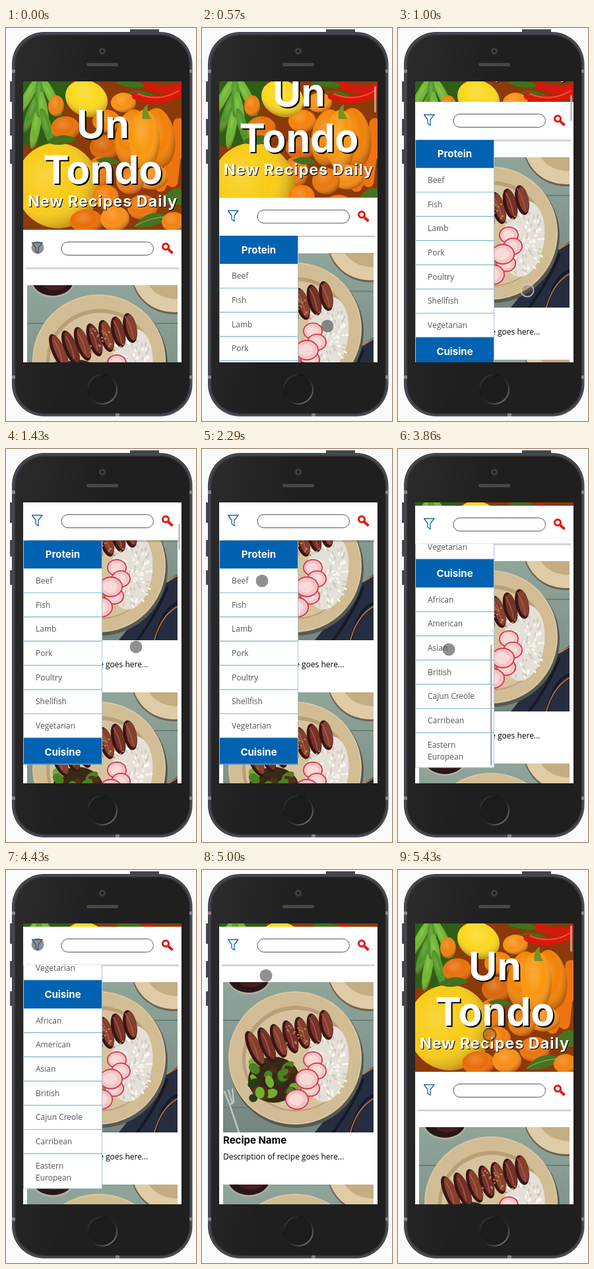
Recreate the animation shown at these times as an HTML page. Size 288 by 596 pixels, loop 5570 ms.

```html
<!DOCTYPE html>
<html lang="en">
<head>
<meta charset="utf-8">
<title>Recipe app</title>
<style>
html, body { margin: 0; width: 100%; height: 100%; overflow: hidden; background: #fafafa; }
body > svg { display: block; width: 100vw; height: 100vh; }
text { font: 12px "Open Sans", sans-serif; }
.bold { font: 700 15px Inter, sans-serif; }
.hero { font: 700 59px Inter, sans-serif; fill: #fff; text-anchor: middle; filter: drop-shadow(2px 2px 0 #000); }
.tag { font-size: 23.5px; letter-spacing: .9px; filter: drop-shadow(1.5px 1.5px 0 #000); }
.head { fill: #fff; text-anchor: middle; }
.item { fill: #555; }
</style>
</head>
<body>
<svg viewBox="0 0 288 596">
  <defs>
    <clipPath id="screenClip"><path d="M26 81h240v426H26z"/></clipPath>
    <clipPath id="dishClip"><path d="M0 0h228v228H0z"/></clipPath>
    <radialGradient id="shade" cx=".4" cy=".35" r=".65">
      <stop stop-color="#fff" stop-opacity=".2"/>
      <stop offset=".55" stop-color="#fff" stop-opacity="0"/>
      <stop offset="1" stop-color="#5a1c00" stop-opacity=".35"/>
    </radialGradient>
    <linearGradient id="homeRim" x2="1" y2="1">
      <stop stop-color="#555"/><stop offset=".3" stop-color="#151515"/>
      <stop offset=".6" stop-color="#2a2a2a"/><stop offset="1" stop-color="#8c8c8c"/>
    </linearGradient>
    <linearGradient id="face" x2="1" y2=".3">
      <stop stop-color="#2b2b2b"/><stop offset=".5" stop-color="#1f1f1f"/>
    </linearGradient>
    <linearGradient id="table" x2="0" y2="1">
      <stop stop-color="#8fa59a"/><stop offset="1" stop-color="#75857f"/>
    </linearGradient>
    <linearGradient id="navShadow" x2="0" y2="1">
      <stop stop-color="#000" stop-opacity=".32"/><stop offset="1" stop-color="#000" stop-opacity="0"/>
    </linearGradient>
    <g id="dish" clip-path="url(#dishClip)"></g>
    <g id="card">
      <use href="#dish"/>
      <text class="bold" y="245">Recipe Name</text>
      <text y="269">Description of recipe goes here...</text>
    </g>
  </defs>

  <!-- phone -->
  <path d="M6 81h6v31H6zM6 138h6v25H6zM6 184h6v22H6zM188 2h44v6h-44z" fill="#46474e"/>
  <rect x="9" y="6" width="273.5" height="583" rx="49" fill="#3c3d44"/>
  <rect x="11" y="8" width="270" height="579.5" rx="47.5" fill="none" stroke="#5a5b63"/>
  <path d="M9 63h5v5H9zM278 63h5v5h-5zM9 527h5v5H9zM278 527h5v5h-5zM166 584h6v5h-6z" fill="#85868c"/>
  <rect x="14" y="11" width="264" height="573.5" rx="45" fill="url(#face)"/>
  <circle cx="146" cy="35" r="5.5" fill="#34343a"/>
  <circle cx="146" cy="35" r="3" fill="#1b1b22" stroke="#55555e"/>
  <rect x="122" y="53" width="48" height="5" rx="2.5" fill="#47474b"/>
  <circle cx="146" cy="548" r="22" fill="#1c1c1c" stroke="url(#homeRim)" stroke-width="2"/>

  <g clip-path="url(#screenClip)">
    <path d="M26 81h240v426H26z" fill="#fff"/>
    <g id="page"><use href="#card" x="32" y="390"/><use href="#card" x="32" y="697"/></g>
    <svg id="hero" x="26" y="81" width="240" height="225">
      <g transform="translate(-26 -81)">
        <g id="veg"></g>
        <g id="title">
          <text class="hero" x="147" y="167">Un</text>
          <text class="hero" x="147" y="236">Tondo</text>
          <text class="hero tag" x="146.5" y="271">New Recipes Daily</text>
        </g>
      </g>
    </svg>
    <g id="nav">
      <path d="M30 57h232v4H30z" fill="url(#navShadow)"/>
      <path d="M26 0h240v57.5H26z" fill="#fff"/>
      <path d="M39.5 19.5h15.5l-6 7.5v8.5l-4-3v-5.5z" fill="none" stroke="#1464a5" stroke-width="1.3" stroke-linejoin="round"/>
      <rect x="84" y="18.5" width="139.5" height="20" rx="10" fill="#fff" stroke="#555"/>
      <g fill="none" stroke="#e3170d"><circle cx="242" cy="25.5" r="4.5" stroke-width="3"/><path d="M246 29.5l6.5 6" stroke-width="4"/></g>
    </g>
    <svg id="menu" x="26" width="120" height="340">
      <path d="M0 0h120v340H0z" fill="#fff"/>
      <g id="list"></g>
      <rect id="thumb" x="114" width="2.5" height="183" rx="1.2" fill="#aaa"/>
      <path d="M.5 0v339.5h119V0" fill="none" stroke="#9cc6e0"/>
    </svg>
    <rect id="bar" x="261" width="3" height="40" rx="1.5" fill="#b9b9b9" fill-opacity=".8"/>
    <circle id="touch" r="9.5"/>
  </g>
</svg>
<script>
const $ = id => document.getElementById(id);
const set = (id, attrs) => { for (const a in attrs) $(id).setAttribute(a, attrs[a]); };

const oval = (x, y, rx, ry, fill, turn = 0) =>
  `<ellipse cx="${x}" cy="${y}" rx="${rx}" ry="${ry}" fill="${fill}" transform="rotate(${turn} ${x} ${y})"/>`;
const fruit = (x, y, rx, ry, fill, turn) =>
  oval(x, y, rx, ry, fill, turn) + oval(x, y, rx, ry, 'url(#shade)', turn);
const path = (d, fill, stroke = 'none', width = 1) =>
  `<path d="${d}" fill="${fill}" stroke="${stroke}" stroke-width="${width}" stroke-linecap="round"/>`;
const many = (n, make) => Array.from({ length: n }, (_, i) => make(i)).join('');

let seed = 7;
const rand = () => (seed = seed * 16807 % 2147483647) / 2147483647;

$('veg').innerHTML =
  path('M26 81h240v225H26z', '#8c3a08') +
  path('M26 81h72l-14 60-12 38H26z', '#2e5f14') +
  many(7, i => fruit(33 + i * 6, 104 + (i % 3) * 24, 7, 32, i % 2 ? '#4c9422' : '#6db52f', 28 - i * 9)) +
  fruit(76, 118, 12, 16, '#ef7f0c') + fruit(90, 152, 22, 18, '#e86f08') +
  fruit(152, 141, 21, 17, '#f58207') + fruit(178, 113, 19, 15, '#f98f12') +
  fruit(122, 107, 33, 27, '#fbd81c', 25) +
  path('M165 83q28 12 52 5q-24-11-52-5M186 97q18 14 42 8q-18-13-42-8', '#3c741d') +
  path('M196 103q36 14 70-6M214 87q28 13 52 2', 'none', '#d8180d', 11) +
  path('M200 100q32 13 62-5', 'none', '#f4502f', 2) +
  path('M262 145l-10 88M266 178l-32 62', 'none', '#ed7410', 17) +
  fruit(150, 181, 23, 19, '#d96507') + fruit(142, 218, 19, 23, '#ef780b') +
  fruit(190, 166, 24, 43, '#f38506', 8) + fruit(232, 166, 24, 45, '#f18003', -8) +
  fruit(210, 170, 23, 46, '#fa970d') +
  path('M207 138q-2-17 8-22q-2 15 6 22', '#719426') +
  fruit(221, 226, 25, 19, '#f58a13') + fruit(188, 232, 21, 20, '#e97808') +
  fruit(78, 239, 63, 65, '#f8cb12', -20) +
  path('M60 173q24-19 48-4q-26 14-48 4M136 200q24-10 37 5q-22 6-37-5', '#456f1e') +
  fruit(151, 256, 20, 18, '#f57d08') + fruit(122, 293, 25, 18, '#e96c05') +
  fruit(165, 289, 22, 19, '#f88d12') + fruit(207, 272, 23, 19, '#ed7309') +
  path('M194 302q20-31 53-17q-18 21-53 17M236 262q12-23 30-18v23q-15 5-30-5', '#47721f') +
  fruit(254, 294, 18, 15, '#f28110') +
  path('M196 300q23-13 48-14', 'none', '#9eb84b');

const meat = i => {
  const x = 48 + i * 18, y = 101 - i * 6;
  return oval(x, y, 10, 29 - i, '#3a1512', -24 + i * 2) +
    oval(x + 2, y - 1, 7.5, 26 - i, i % 2 ? '#743229' : '#86402f', -24 + i * 2) +
    path(`M${x - 7} ${y - 17}q9 14 12 33`, 'none', '#a75c48', 1.5);
};
const radish = (x, y, r) => oval(x, y, r, r * .87, '#d6344e') +
  oval(x, y, r - 1.8, r * .87 - 1.8, '#f6c4c4') + oval(x - 1, y, r * .6, r * .5, '#f9dad6');

$('dish').innerHTML =
  path('M0 0h228v228H0z', 'url(#table)') +
  path('M0 58h228M0 190h228', 'none', '#677f78', 2) +
  oval(39, -8, 34, 27, '#b3aaa0') + oval(39, -9, 32, 25, '#261718') + oval(42, -7, 21, 15, '#4b1d20') +
  oval(222, -18, 64, 62, '#6b6354') + oval(222, -20, 63, 61, '#dfcba5') + oval(225, -24, 48, 45, '#c4ad83') +
  path('M228 128Q198 148 180 176L139 228H228z', '#272d40') +
  path('M228 172q-23 7-34 56M212 148q-12 34-45 80', 'none', '#151a29', 4) +
  path('M213 139l15-9M228 177q-25 13-35 51', 'none', '#d57932', 1.5) +
  path('M2 166l8 20 14 42M8 164l6 20M14 162l2 20-6 4', 'none', '#c0c5c1', 2.5) +
  oval(111, 119, 102, 102, '#565a50') + oval(109, 115, 101, 101, '#dbc7a1') +
  oval(109, 115, 99, 99, '#d2bc93') + oval(110, 116, 81, 80, '#b89f77') +
  oval(111, 118, 77, 76, '#d6c39d') +
  oval(158, 124, 32, 58, '#e4e0d8', 8) +
  many(120, () => {
    const a = rand() * 6.28, r = Math.sqrt(rand());
    return oval((158 + 31 * r * Math.cos(a)).toFixed(1), (124 + 55 * r * Math.sin(a)).toFixed(1), 3, 1.5,
      rand() < .6 ? '#f8f6ef' : '#cfcac0', a * 50);
  }) +
  oval(77, 148, 39, 35, '#382817') +
  many(26, i => oval(45 + rand() * 66, 122 + rand() * 54, 5 + rand() * 6, 4 + rand() * 4,
    ['#4c7f23', '#75ad32', '#513116', '#263d16'][i % 4], rand() * 180)) +
  many(7, meat) +
  many(22, () => oval(91 + rand() * 58, 64 + rand() * 45, 1.7, 1.2, '#bd8351')) +
  radish(136, 118, 15) + radish(142, 135, 15) + radish(132, 161, 15) + radish(112, 178, 18) +
  radish(127, 147, 18);

// Menu list, built from top to bottom.
const ROW = 36.7, HEAD = 42.8;
const sections = {
  Protein: ['Beef', 'Fish', 'Lamb', 'Pork', 'Poultry', 'Shellfish', 'Vegetarian'],
  Cuisine: ['African', 'American', 'Asian', 'British', 'Cajun Creole', 'Carribean', 'Eastern|European']
};

function buildList() {
  let y = 0, html = '';
  for (const name in sections) {
    html += path(`M0 ${y}h120v${HEAD}H0z`, '#0062b1') +
      `<text class="bold head" x="60" y="${y + 26.5}">${name}</text>`;
    y += HEAD;
    for (const item of sections[name]) {
      const lines = item.split('|');
      lines.forEach((line, i) => html += `<text class="item" x="19" y="${y + 22.5 + i * 18}">${line}</text>`);
      y += ROW + 18 * (lines.length - 1);
      html += path(`M0 ${y}h120`, 'none', '#7db5da', 1.2);
    }
  }
  return html;
}
$('list').innerHTML = buildList();

// Keys are [step, value, ...], with seven steps per second.
const scrollKeys = [[3, 0], [7, 194], [10, 328], [17, 328], [22, 220], [35, 220], [38, 0]];
const listKeys = [[24, 0], [27, 276]];
const touchKeys = [[0, 48, 333], [1, 48, 333], [3, 188, 470], [7, 196, 398], [10, 197, 300], [16, 91, 200],
  [18, 86, 196], [22, 76, 272], [24, 78, 420], [27, 77, 304], [28, 77, 300], [31, 48, 113], [33, 48, 113],
  [35, 97, 160], [38, 139, 250]];

function at(keys, k) {
  const i = keys.findIndex(key => key[0] > k);
  if (i < 0) return keys.at(-1).slice(1);
  if (!i) return keys[0].slice(1);
  const a = keys[i - 1], b = keys[i], p = (k - a[0]) / (b[0] - a[0]);
  return a.slice(1).map((v, j) => v + (b[j + 1] - v) * p);
}

function draw(now) {
  const k = Math.floor((now % 5570 + 4) * .007);
  const [offset] = at(scrollKeys, k), [listTop] = at(listKeys, k), [x, y] = at(touchKeys, k);
  const navY = Math.max(81, 306 - offset);
  set('page', { transform: `translate(0 ${-offset})` });
  set('title', { transform: `translate(0 ${-offset})` });
  set('hero', { height: Math.max(0, 225 - offset) });
  set('nav', { transform: `translate(0 ${navY})` });
  set('menu', { y: navY + 57.5, visibility: k > 1 && k < 32 ? 'visible' : 'hidden' });
  set('list', { transform: `translate(0 ${-listTop})` });
  set('thumb', { y: 3 + listTop * .545, opacity: k > 24 && k < 30 ? 1 : 0 });
  set('bar', { y: 84 + offset * .09, opacity: k > 3 && k < 12 || k > 17 && k < 22 || k > 35 ? 1 : 0 });
  const ring = k > 6 && k < 10 || k > 37;
  set('touch', {
    cx: x, cy: y,
    fill: ring ? 'rgba(90,80,70,.25)' : 'rgba(70,70,70,.6)',
    stroke: !ring ? 'none' : k > 30 ? 'rgba(85,55,20,.75)' : 'rgba(215,215,215,.75)',
    'stroke-width': 2
  });
}

const start = performance.now();
function tick() {
  draw(performance.now() - start);
  requestAnimationFrame(tick);
}
tick();
</script>
</body>
</html>
```
